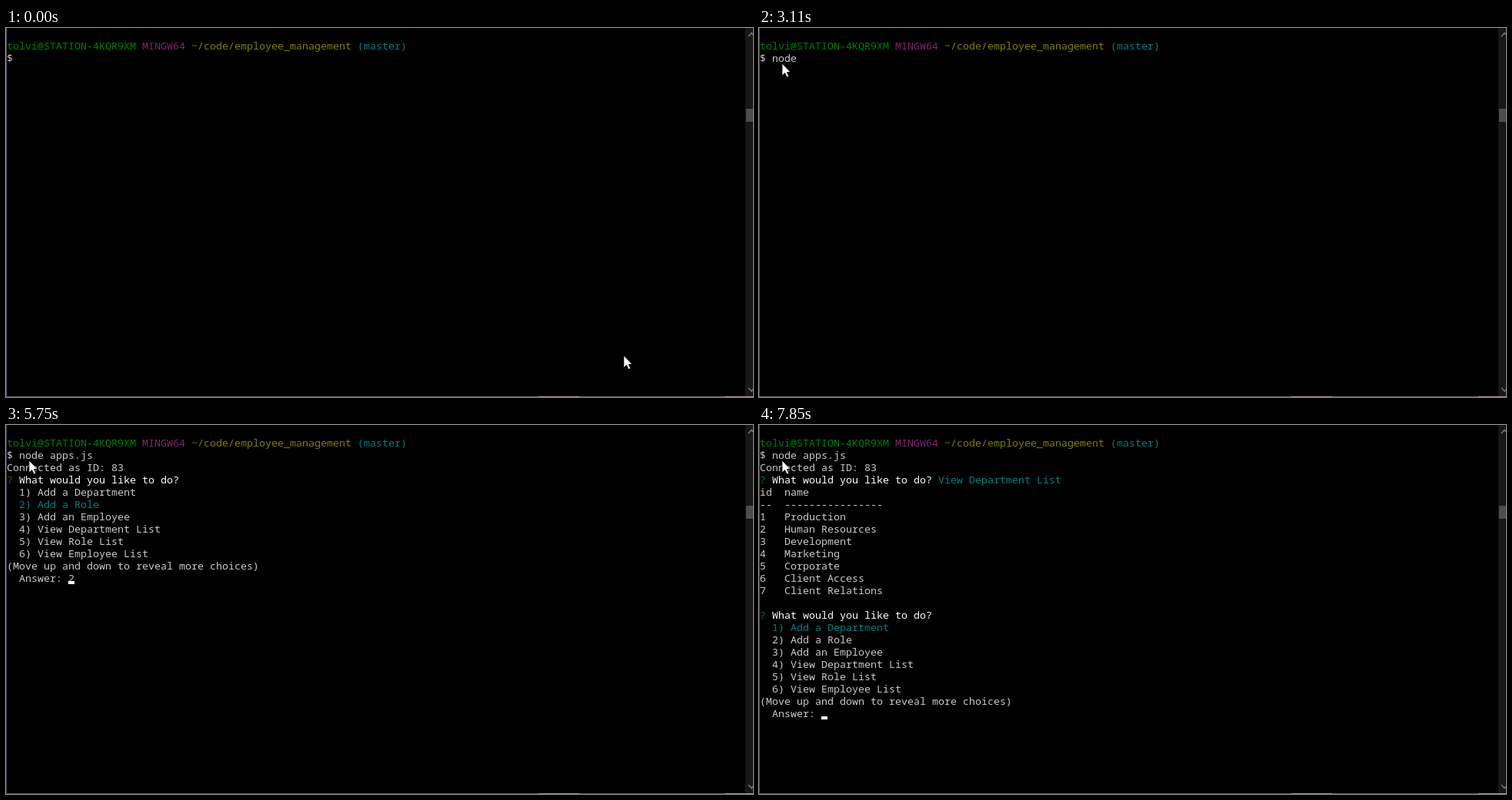
An HTML page that plays this animation: 971x480 px, repeating every 8 s.

```html
<!DOCTYPE html>
<html lang="en">
<head>
<meta charset="utf-8">
<title>Terminal session</title>
<style>
  html, body { margin: 0; width: 100%; height: 100%; overflow: hidden; background: #000; }
  svg { display: block; width: 971px; height: 480px; }
  text { font: 500 13.3333px "Noto Sans Mono", "DejaVu Sans Mono", monospace; white-space: pre; }
</style>
</head>
<body>
<svg viewBox="0 0 971 480">
  <rect width="971" height="480"/>
  <rect id="edge" width="1" height="480"/>
  <rect x="961" width="10" height="479" fill="#171717"/>
  <rect x="962" y="105" width="9" height="17" fill="#4d4d4d"/>
  <path d="M0 479.5H971" stroke="#665661"/>
  <path d="M692 479.5H745M935 479.5H971" stroke="#a8949f"/>
  <path d="M965 11L969 6.5L973 11M965 468L969 472.5L973 468" fill="none" stroke="#73719c" stroke-width="1.5"/>
  <g id="screen"></g>
  <rect id="caret" width="8" height="4" fill="#fff"/>
  <path id="pointer" d="M0 0V16L3.7 12.6L6.3 18L8.9 17L6.4 11.6H11Z" fill="#fff" stroke="#000" stroke-width=".8"/>
</svg>
<script>
const LOOP = 8000, FOCUS = 1010;
const BLINK_START = 1540, BLINK = 523;
const GRAY = '#cacaca', WHITE = '#fff', GREEN = '#008000', PLUM = '#80286e', OLIVE = '#808000', TEAL = '#008080';
const CHOICES = ['Add a Department', 'Add a Role', 'Add an Employee', 'View Department List', 'View Role List', 'View Employee List'];
const DEPARTMENTS = ['Production', 'Human Resources', 'Development', 'Marketing', 'Corporate', 'Client Access', 'Client Relations'];

const $ = id => document.getElementById(id);
const escapeText = s => s.replace(/&/g, '&amp;').replace(/</g, '&lt;');
const put = (col, row, s, fill = GRAY) =>
  `<text x="${1 + col * 8}" y="${row * 16 + 12}" fill="${fill}">${escapeText(s)}</text>`;

// Writes coloured pieces one after another on a row
function line(row, ...pieces) {
  let col = 0;
  return pieces.map(([s, fill]) => {
    const out = put(col, row, s, fill);
    col += s.length;
    return out;
  }).join('');
}

const question = (row, answer = '') =>
  line(row, ['? ', GREEN], ['What would you like to do? ', WHITE], [answer, TEAL]);

function menu(row, picked, answer) {
  return question(row) +
    CHOICES.map((c, i) => put(2, row + 1 + i, `${i + 1}) ${c}`, i + 1 === picked ? TEAL : GRAY)).join('') +
    put(0, row + 7, '(Move up and down to reveal more choices)') +
    put(2, row + 8, 'Answer: ' + answer);
}

function table(row) {
  return put(0, row, 'id  name') + put(0, row + 1, '--  ' + '-'.repeat(16)) +
    DEPARTMENTS.map((d, i) => put(0, row + 2 + i, `${i + 1}   ${d}`)).join('');
}

// The session: each event adds to the state before it
const events = [{ time: 0, html: '', command: '', col: 2, row: 2 }];
const last = () => events[events.length - 1];
const add = (time, change) => events.push({ ...last(), time, ...change });

function type(start, gap, keys) {
  keys.forEach((key, i) => {
    const command = last().command + key;
    add(start + i * gap, { command, col: 2 + command.length });
  });
}
const pick = (time, n) => add(time, { html: connected + menu(4, n, n) });

const connected = put(0, 3, 'Connected as ID: 83');
add(BLINK_START, {});
type(2270, 123, [...'node']);
type(3350, 310, [...' ap']);
type(4120, 0, ['ps.js ']);
add(4430, { col: 0, row: 3 });
add(4890, { html: connected, row: 4 });
add(4970, { html: connected + menu(4, 1, ''), col: 10, row: 12 });
pick(5750, 2);
pick(5910, 3);
pick(6300, 4);
add(6920, { html: connected + question(4, CHOICES[3]) + table(5) + menu(15, 1, ''), row: 23 });

const prompt = line(1, ['tolvi@STATION-4KQR9XM ', GREEN], ['MINGW64 ', PLUM],
  ['~/code/employee_management ', OLIVE], ['(master)', TEAL]);

// One steady timer flips the caret; every event turns it back on
const ticks = t => Math.floor((t - BLINK_START) / BLINK);
const caretOn = (t, since) => t >= BLINK_START && (ticks(t) - ticks(since)) % 2 === 0;

// The pointer comes back on a curve that overshoots upwards, in 8 steps
function pointerAt(t) {
  if (t < 70) return [803, 426];
  const p = Math.min(1, Math.floor((t - 300) / 77) / 7), q = 1 - p;
  return [30 + 9 * q * q, 86 * q * q - 90 * p * q + 46 * p * p];
}

function place(id, visible, x, y) {
  $(id).setAttribute('visibility', visible ? 'visible' : 'hidden');
  $(id).setAttribute('transform', `translate(${x} ${y})`);
}

let shown;
function draw(t) {
  const now = events.findLast(e => e.time <= t);
  if (now !== shown) {
    $('screen').innerHTML = prompt + put(0, 2, '$ ' + now.command) + now.html;
    shown = now;
  }
  place('caret', caretOn(t, now.time), 1 + now.col * 8, now.row * 16 + 11);
  place('pointer', t < 70 || t >= 300, ...pointerAt(t));
  $('edge').setAttribute('fill', t < FOCUS ? '#615f7e' : '#4d4b64');
}

let start;
function tick(now) {
  start ??= now;
  draw((now - start) % LOOP);
  requestAnimationFrame(tick);
}
draw(0);
requestAnimationFrame(tick);
</script>
</body>
</html>
```
